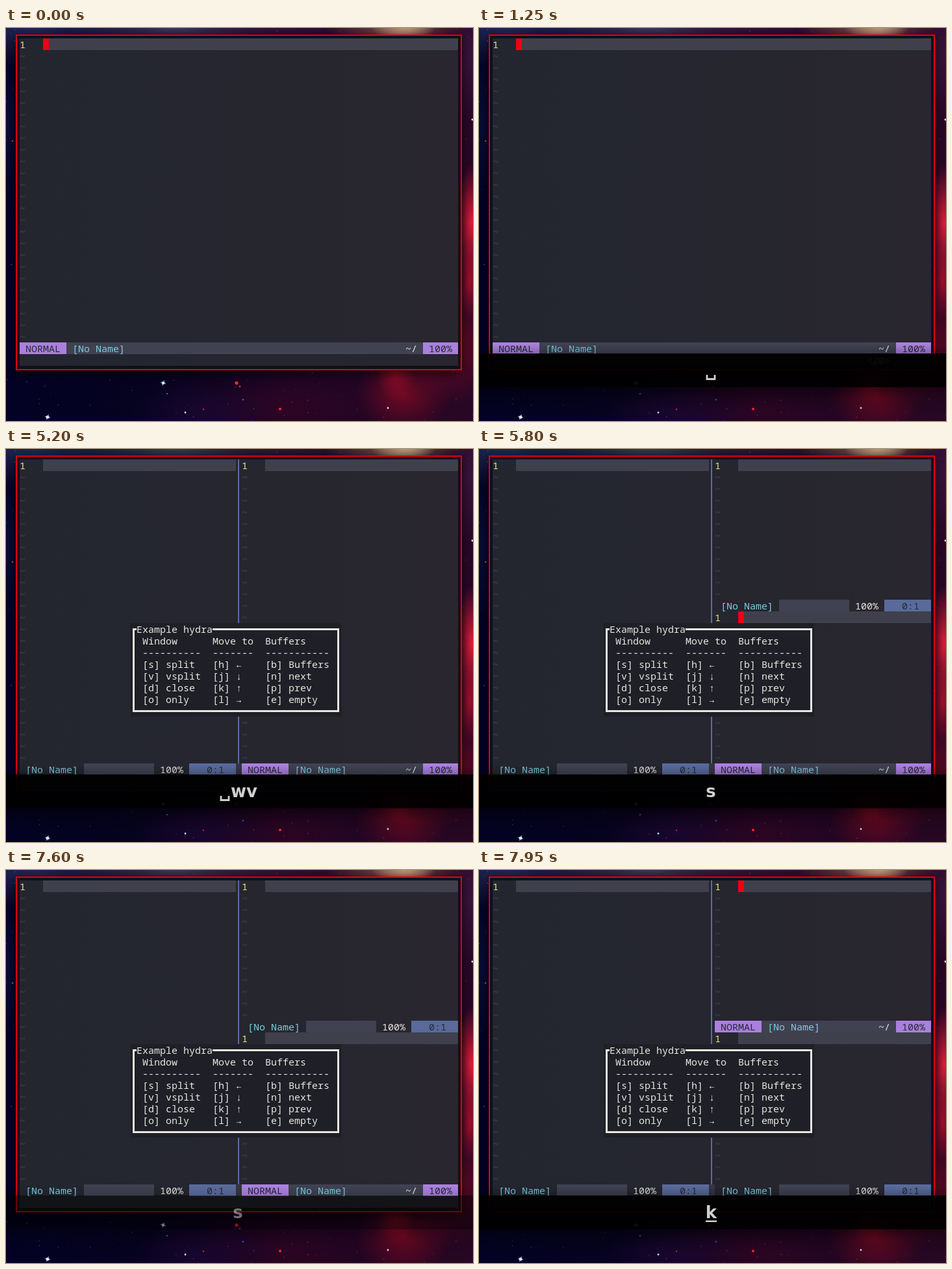
An HTML page that plays this animation: 719 px wide and 605 px high, repeating every 8 s.

```html
<!DOCTYPE html>
<html lang="en">
<head>
<meta charset="utf-8">
<title>Window hydra</title>
<style>
html, body { margin: 0; width: 100%; height: 100%; overflow: hidden; background: #03021d; }
svg { display: block; width: 719px; height: 605px; }
#term text { font: 15px "Noto Sans Mono", "DejaVu Sans Mono", monospace; white-space: pre; }
#keys text { font: bold 26px "DejaVu Sans", sans-serif; }
</style>
</head>
<body>
<svg viewBox="0 0 719 605" xmlns="http://www.w3.org/2000/svg">
  <defs>
    <linearGradient id="sky">
      <stop offset="0" stop-color="#030224"/><stop offset=".3" stop-color="#06031f"/>
      <stop offset=".6" stop-color="#1a0422"/><stop offset="1" stop-color="#280724"/>
    </linearGradient>
    <linearGradient id="glass">
      <stop offset="0" stop-color="#24262f"/><stop offset=".45" stop-color="#25262f"/>
      <stop offset="1" stop-color="#29262f"/>
    </linearGradient>
    <linearGradient id="above" x2="0" y2="1">
      <stop offset="0" stop-opacity="0"/><stop offset="1" stop-opacity=".22"/>
    </linearGradient>
    <linearGradient id="below" x2="0" y2="1">
      <stop offset="0" stop-opacity=".5"/><stop offset=".4" stop-opacity=".2"/>
      <stop offset="1" stop-opacity="0"/>
    </linearGradient>
    <filter id="soft" x="-20%" y="-20%" width="140%" height="140%"><feGaussianBlur stdDeviation="7"/></filter>
  </defs>
  <g id="space"></g>
  <rect x="15" y="14" width="687" height="517" opacity=".6" filter="url(#soft)"/>
  <rect x="16" y="11" width="685" height="515" fill="#10101a" stroke="#e2000f" stroke-width="2"/>
  <rect x="21" y="16" width="675" height="504" fill="url(#glass)"/>
  <g id="term"></g>
  <g id="keys">
    <rect y="487" width="719" height="14" fill="url(#above)"/>
    <rect y="501" width="719" height="52" opacity=".94"/>
    <rect y="553" width="719" height="44" fill="url(#below)"/>
    <g id="label"></g>
  </g>
</svg>
<script>
const LOOP = 8000, ROW = 18, TOP = 16, LEFT = 21, RIGHT = 696, SPLIT = 363;
const C = {
  bar: '#404151', line: '#3f404b', purple: '#aa80de', blue: '#596a9b', cyan: '#7ccbe0',
  ink: '#282a36', white: '#e8e6de', num: '#e9e18c', tilde: '#44444f', red: '#f00014', pop: '#1e1f27'
};
const $ = id => document.getElementById(id);
const rowY = r => TOP + r * ROW;
const rect = (x, y, w, h, fill) => `<rect x="${x}" y="${y}" width="${w}" height="${h}" fill="${fill}"/>`;
const text = (x, y, s, fill) => `<text x="${x}" y="${y + 15}" fill="${fill}">${s}</text>`;

function drawSpace() {
  let seed = 17;
  const rnd = () => (seed = seed * 16807 % 2147483647) / 2147483647;
  // x, y, rx, ry, colour, opacity
  const clouds = [
    [40, 0, 170, 60, '#27315c', .8], [260, 0, 170, 28, '#4a4d66', .75], [430, 0, 150, 24, '#3c1a3c', .7],
    [612, -2, 50, 22, '#fff0b0', 1], [600, 0, 110, 30, '#a06a5a', .7], [718, 40, 50, 110, '#3d1740', .8],
    [716, 300, 22, 90, '#ff1f3a', .85], [714, 390, 18, 60, '#d5142e', .7], [690, 490, 70, 90, '#7c0a22', .7],
    [612, 565, 75, 60, '#880a22', .75], [600, 530, 30, 45, '#c80f28', .45], [430, 585, 150, 60, '#3b0625', .6],
    [300, 590, 110, 45, '#1d0836', .7], [0, 150, 30, 120, '#0b1440', .6]
  ];
  let defs = '', out = rect(0, 0, 719, 605, 'url(#sky)');
  clouds.forEach(([x, y, rx, ry, c, o], i) => {
    defs += `<radialGradient id="c${i}"><stop stop-color="${c}" stop-opacity="${o}"/>` +
      `<stop offset=".45" stop-color="${c}" stop-opacity="${o * .55}"/>` +
      `<stop offset="1" stop-color="${c}" stop-opacity="0"/></radialGradient>`;
    out += `<ellipse cx="${x}" cy="${y}" rx="${rx}" ry="${ry}" fill="url(#c${i})"/>`;
  });
  const dot = (x, y, r, c, o) => `<circle cx="${x}" cy="${y}" r="${r}" fill="${c}" opacity="${o}"/>`;
  for (let i = 0; i < 520; i++) {
    const x = rnd() * 719, y = rnd() * 605, warm = rnd() < x / 800;
    out += dot(x.toFixed(1), y.toFixed(1), (.4 + rnd() * .5).toFixed(2), warm ? '#e02c3c' : '#7590c0', (.2 + rnd() * .5).toFixed(2));
  }
  const bright = [
    [242, 546.5, 2.3, '#e8f2ff'], [64, 599, 2.5, '#d8f0ff'], [355, 546.5, 2.6, '#ff2a30'], [422, 586.5, 2, '#ff2a30'],
    [360, 552, 1.4, '#e02030'], [588, 585, 1.4, '#dde6ff'], [276, 592, 1.4, '#bfe4f4'], [365, 572, 1.6, '#3048b0'],
    [718, 141, 1.4, '#fff'], [10, 174, 1.3, '#c04a20'], [304, 587, 1.2, '#e02030'], [248, 563, 1, '#6888b0']
  ];
  bright.forEach(([x, y, r, c]) => out += dot(x, y, r, c, 1));
  [[242, 546.5], [64, 599]].forEach(([x, y]) =>
    out += `<path d="M${x - 4} ${y - 1}l8 2M${x - 1.5} ${y + 4}l3 -8" stroke="#cfe4ff" stroke-width=".8"/>`);
  $('space').innerHTML = `<defs>${defs}</defs>` + out;
}

// One editor pane: number, cursor line, filler rows and status bar
function pane(x, end, first, status, active, cursor) {
  const y = rowY(first), s = rowY(status);
  let out = rect(x + 36, y, end - x - 36, ROW, C.line) + text(x, y, '1', C.num);
  if (cursor) out += rect(x + 36, y, 9, ROW, C.red);
  for (let r = first + 1; r < status; r++) out += text(x, rowY(r), '~', C.tilde);
  if (active) {
    out += rect(x, s, end - x, ROW, C.bar) + rect(x, s, 72, ROW, C.purple) + rect(end - 54, s, 54, ROW, C.purple) +
      text(x + 9, s, 'NORMAL', C.ink) + text(x + 81, s, '[No Name]', C.cyan) +
      text(end - 81, s, '~/', C.white) + text(end - 45, s, '100%', C.ink);
  } else {
    out += rect(x + 99, s, 108, ROW, C.bar) + rect(x + 261, s, 72, ROW, C.blue) +
      text(x + 9, s, '[No Name]', C.cyan) + text(x + 216, s, '100%', C.white) + text(x + 288, s, '0:1', C.ink);
  }
  return out;
}

function popup() {
  const cols = [
    [210, ['Window', '-'.repeat(10), '[s] split', '[v] vsplit', '[d] close', '[o] only']],
    [318, ['Move to', '-'.repeat(7), '[h] ←', '[j] ↓', '[k] ↑', '[l] →']],
    [399, ['Buffers', '-'.repeat(11), '[b] Buffers', '[n] next', '[p] prev', '[e] empty']]
  ];
  let out = rect(192, 268, 324, 144, C.pop) +
    `<path d="M201 277.5H196.5V403.5H511.5V277.5H318" fill="none" stroke="${C.white}" stroke-width="3"/>` +
    text(201, 268, 'Example hydra', C.white);
  for (const [x, lines] of cols) lines.forEach((s, i) => out += text(x, rowY(15 + i), s, C.white));
  return out;
}

function drawTerm(layout, on, pending) {
  let out = '';
  if (!layout) {
    out = pane(LEFT, RIGHT, 0, 26, true, on);
    if (pending) out += text(597, rowY(27), '&lt;20&gt;', C.white);
  } else {
    out = pane(LEFT, 354, 0, 26, false, false) + rect(357, 16, 2, 468, '#5b6b9f') + rect(354, 484, 9, ROW, '#353642');
    if (layout === 1) out += pane(SPLIT, RIGHT, 0, 26, true, on);
    else {
      const upper = layout === 3;
      out += pane(SPLIT, RIGHT, 0, 12, upper, upper && on) + pane(SPLIT, RIGHT, 13, 26, !upper, !upper && on);
    }
    out += popup();
  }
  $('term').innerHTML = out;
}

const INK = '#cfcfcf';
const space = x => `<path d="M${x} 534v6.5h12v-6.5" fill="none" stroke="${INK}" stroke-width="2.8"/>`;
const word = (x, s, anchor) => `<text x="${x}" y="536" text-anchor="${anchor}" fill="${INK}">${s}</text>`;
const LABELS = {
  space: space(351),
  wv: space(331) + word(346, 'wv', 'start'),
  s: word(357, 's', 'middle'),
  k: word(357.5, 'k', 'middle') + rect(349, 539.5, 17, 2.5, INK)
};

// Last value whose start time has been reached
const at = (steps, t) => steps.reduce((v, [from, next]) => t >= from ? next : v, steps[0][1]);
const LAYOUT = [[0, 0], [3800, 1], [5800, 2], [7950, 3]];
const CURSOR = [[0, 1], [550, 0], [1050, 1], [4250, 0], [4750, 1], [5200, 0], [5800, 1],
  [6450, 0], [6700, 1], [7200, 0], [7700, 1]];
const LABEL = [[0, 'space'], [3800, 'wv'], [5800, 's'], [7800, 'k']];
const FADE = [[0, 0], [1050, .2], [1100, .45], [1150, .7], [1250, 1], [7600, .52], [7700, .2], [7800, .36], [7950, 1]];

let shown = '';
function update(t) {
  const layout = at(LAYOUT, t), on = at(CURSOR, t), label = at(LABEL, t), fade = at(FADE, t);
  const pending = t >= 1100 && t < 3800;
  const state = [layout, on, label, fade, pending].join();
  if (state === shown) return;
  shown = state;
  drawTerm(layout, on, pending);
  $('label').innerHTML = LABELS[label];
  $('keys').setAttribute('opacity', fade);
}

drawSpace();
update(0);
const start = performance.now();
(function tick() {
  update((performance.now() - start) % LOOP);
  requestAnimationFrame(tick);
})();
</script>
</body>
</html>
```
